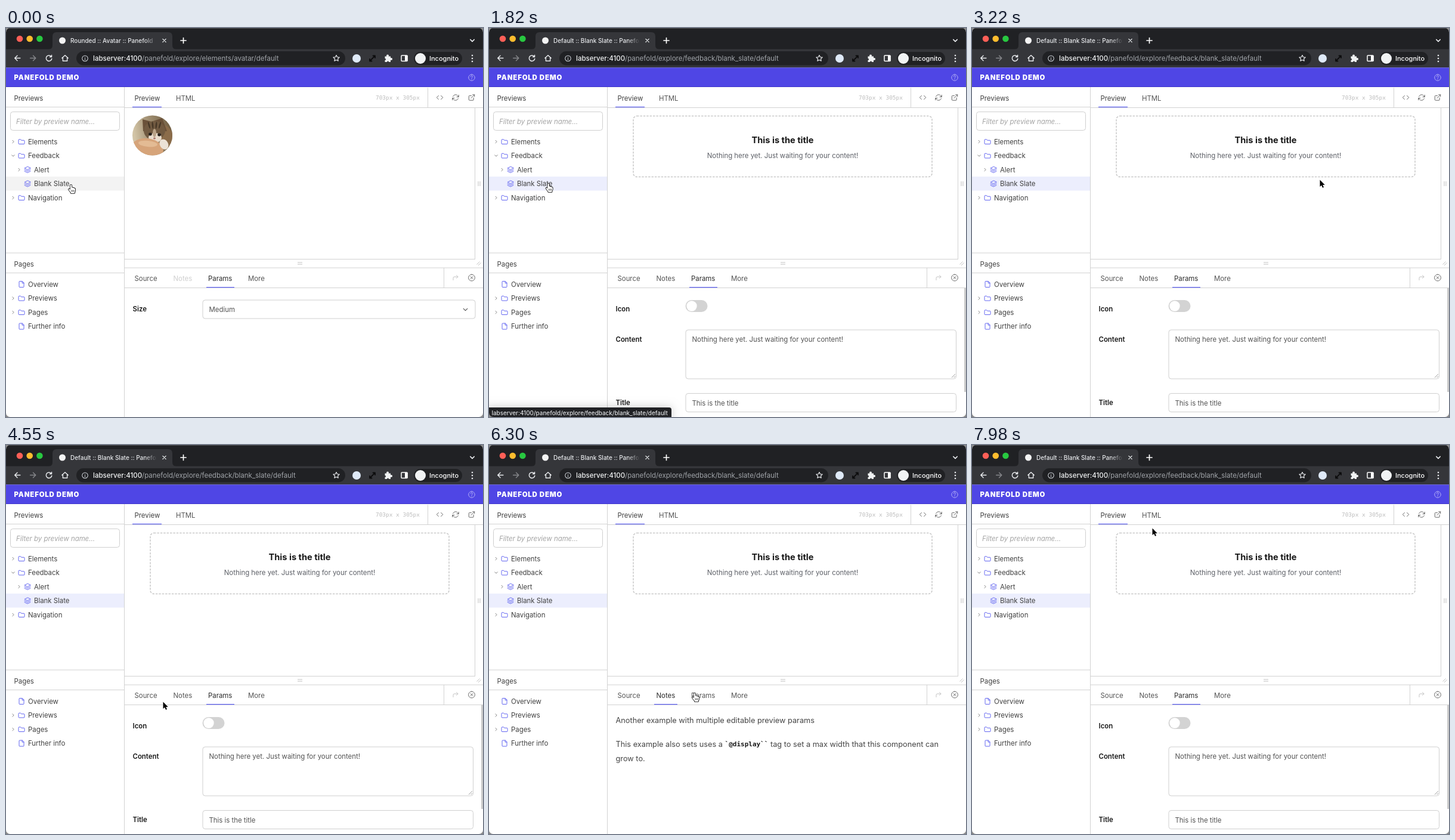
These frames come from a looping animation (800 by 652 pixels, 8000 ms). An HTML page with a canvas:

```html
<!DOCTYPE html>
<html lang="en">
<head>
<meta charset="utf-8">
<title>Component preview</title>
<style>
  html, body { margin: 0; width: 100%; height: 100%; overflow: hidden; background: #fff; }
  canvas { display: block; width: 800px; height: 652px; }
</style>
</head>
<body>
<canvas id="stage"></canvas>
<script>
const W = 800, H = 652, LOOP = 8000, STEP = 70;
const SANS = 'Inter, "Open Sans", sans-serif';
const MONO = '"DejaVu Sans Mono", monospace';
const INDIGO = '#4f46e5', ACCENT = '#6366f1', LINE = '#d2d2d2', INK = '#404040', SOFT = '#a3a3a3';
const BAR = '#35363a', DARK = '#202124';
const HOST = 'labserver:4100';

// Scene changes in ms
const STATUS_ON = 210, LOADED = 1470, STATUS_WIDE = 1680;
const NOTES_ON = 4830, NOTES_OFF = 6510;

// Pointer hot spot: time, x, y
const PATH = [
  [0, 109, 263], [420, 99.5, 261], [2380, 99.5, 261], [3080, 583.5, 254.5],
  [4200, 583.5, 254.5], [4550, 263.5, 430.5], [4740, 295, 416],
  [6020, 295, 416], [6230, 345, 416], [6650, 345, 416],
  [7140, 470, 505], [7420, 400, 470], [7980, 302.5, 139.5]
];

const canvas = document.getElementById('stage');
const c = canvas.getContext('2d');
const dpr = window.devicePixelRatio || 1;
canvas.width = W * dpr;
canvas.height = H * dpr;

function rect(x, y, w, h, fill) {
  c.fillStyle = fill;
  c.fillRect(x, y, w, h);
}

function round(x, y, w, h, r, fill, stroke, lw = 1) {
  c.beginPath();
  c.roundRect(x, y, w, h, r);
  if (fill) { c.fillStyle = fill; c.fill(); }
  if (stroke) { c.strokeStyle = stroke; c.lineWidth = lw; c.stroke(); }
}

function oval(x, y, rx, ry, turn, fill) {
  c.beginPath();
  c.ellipse(x, y, rx, ry, turn, 0, 7);
  c.fillStyle = fill;
  c.fill();
}

const disc = (x, y, r, fill) => oval(x, y, r, r, 0, fill);

// y is the middle of the capitals
function text(s, x, y, { size = 11.4, weight = 400, color = INK, font = SANS, align = 'left', style = '', gap = 0 } = {}) {
  c.font = `${style} ${weight} ${size}px ${font}`;
  c.textAlign = align;
  c.letterSpacing = gap + 'px';
  c.fillStyle = color;
  c.fillText(s, x, y + size * 0.36);
  return c.measureText(s).width;
}

// Icons are drawn on a 24 unit grid centred on x, y
const ICONS = {
  folder: 'M2 6.500a2 2 0 0 1 2-2h5l2.500 3H20a2 2 0 0 1 2 2V18a2 2 0 0 1-2 2H4a2 2 0 0 1-2-2z',
  file: 'M14 2H6a2 2 0 0 0-2 2v16a2 2 0 0 0 2 2h12a2 2 0 0 0 2-2V8zM14 2v6h6',
  layers: 'M12 2 2 7l10 5 10-5zM2 12l10 5 10-5M2 17l10 5 10-5',
  right: 'M9 6l6 6-6 6',
  down: 'M6 9l6 6 6-6',
  cross: 'M5 5l14 14M19 5 5 19',
  plus: 'M12 3v18M3 12h18',
  back: 'M21 12H4M12 4l-8 8 8 8',
  forward: 'M3 12h17M12 4l8 8-8 8',
  reload: 'M20 7a9.500 9.500 0 1 0 1.500 7M21 2v6h-6',
  home: 'M2 12 12 3l10 9M5 10v11h14V10',
  info: 'M12 2a10 10 0 1 0 .01 0M12 11v6M12 7v.5',
  help: 'M12 2a10 10 0 1 0 .01 0M9 9a3 3 0 1 1 4.500 2.600q-1.500.9-1.500 2.400M12 17v.5',
  close: 'M12 2a10 10 0 1 0 .01 0M8.500 8.500l7 7M15.500 8.500l-7 7',
  star: 'M12 2l3.100 6.500 7 .9-5.100 4.900 1.300 7.100L12 18l-6.300 3.400L7 14.300 1.900 9.400l7-.9z',
  code: 'M16 18l6-6-6-6M8 6l-6 6 6 6',
  sync: 'M22 4v6h-6M2 20v-6h6M3.500 9a9 9 0 0 1 15-3.400L22 10M2 14l3.500 4.400A9 9 0 0 0 20.500 15',
  open: 'M18 13v6a2 2 0 0 1-2 2H5a2 2 0 0 1-2-2V8a2 2 0 0 1 2-2h6M15 3h6v6M10 14 21 3',
  turn: 'M15 14l5-5-5-5M4 20v-7a4 4 0 0 1 4-4h12',
  grow: 'M14 3h7v7M10 21H3v-7M21 3 3 21'
};
for (const k in ICONS) ICONS[k] = new Path2D(ICONS[k]);

function icon(name, x, y, size, color, lw = 1) {
  c.save();
  c.translate(x, y);
  c.scale(size / 24, size / 24);
  c.translate(-12, -12);
  c.strokeStyle = color;
  c.lineWidth = lw * 24 / size;
  c.lineCap = c.lineJoin = 'round';
  c.stroke(ICONS[name]);
  c.restore();
}

function browser(loaded) {
  rect(0, 0, W, 66, DARK);
  rect(0, 0, W, 1, '#4d4e51');
  ['#ff5f57', '#febc2e', '#28c840'].forEach((col, i) => disc(23 + i * 16.7, 18, 5.300, col));
  rect(0, 35.500, W, 30.500, BAR);
  c.beginPath();
  c.moveTo(71, 36);
  c.quadraticCurveTo(78, 36, 78, 29);
  c.lineTo(78, 14);
  c.quadraticCurveTo(78, 7, 85, 7);
  c.lineTo(272, 7);
  c.quadraticCurveTo(279, 7, 279, 14);
  c.lineTo(279, 29);
  c.quadraticCurveTo(279, 36, 286, 36);
  c.fillStyle = BAR;
  c.fill();
  disc(94.500, 21, 5.500, '#f4f4f4');

  c.save();
  c.beginPath();
  c.rect(105, 8, 148, 26);
  c.clip();
  text(loaded ? 'Default :: Blank Slate :: Panefold' : 'Rounded :: Avatar :: Panefold', 108, 21,
    { size: 10, weight: 500, color: '#e8eaed' });
  c.restore();
  const fade = c.createLinearGradient(232, 0, 253, 0);
  fade.addColorStop(0, 'rgba(53,54,58,0)');
  fade.addColorStop(1, BAR);
  rect(232, 10, 22, 24, fade);
  icon('cross', 265.500, 21, 9, '#e8eaed', 1.400);
  icon('plus', 297.500, 21, 12, '#fff', 1.700);
  icon('down', 782, 21, 13, '#e8eaed', 1.500);

  icon('back', 19, 50.500, 13, '#e8eaed', 1.400);
  icon('forward', 45.500, 50.500, 13, '#85868a', 1.400);
  icon('reload', 72, 50.500, 12, '#e8eaed', 1.500);
  icon('home', 99, 50.500, 12.500, '#e8eaed', 1.400);
  round(118, 39, 451, 23.500, 12, DARK);
  icon('info', 132.500, 51, 11.500, '#bdc1c6', 1.100);
  const url = { size: 11.500, color: '#a0a4a9' };
  const w = text(HOST, 146, 50.500, { size: 11.500, weight: 500, color: '#f1f3f4' });
  text('/panefold/explore/' + (loaded ? 'feedback/blank_slate' : 'elements/avatar') + '/default', 146 + w, 50.500, url);
  icon('star', 554, 50.500, 12, '#e8eaed', 1.200);

  disc(588, 51, 7, '#dfeaf8');
  icon('grow', 614.500, 51, 12, '#0c0c0d', 1.800);
  rect(635.500, 47.500, 9.500, 9.500, '#f1f3f4');
  disc(640, 46.500, 2, '#f1f3f4');
  disc(646, 52, 2, '#f1f3f4');
  disc(635.500, 52.500, 1.600, BAR);
  disc(640.500, 57, 1.600, BAR);
  round(663, 46, 10, 9.500, 1, null, '#fff', 1.500);
  rect(669, 46, 4.500, 9.500, '#fff');
  round(684, 40, 81, 22, 11, DARK);
  disc(695, 51, 9, '#f1f3f4');
  text('Incognito', 710, 51, { size: 11, weight: 500, color: '#fff' });
  [46, 51, 56].forEach(y => disc(782, y, 1.300, '#e8eaed'));
}

function header() {
  rect(0, 65.500, W, 1, '#2c2a52');
  rect(0, 66.500, W, 32.500, INDIGO);
  rect(0, 98, W, 1, '#4038ca');
  text('PANEFOLD DEMO', 13.500, 83, { weight: 900, color: '#fff', gap: 0.850 });
  icon('help', 781, 83, 12.500, '#b9b5f6');
}

function branch(y, label, x, kind, arrow) {
  if (arrow) icon(arrow, x - 14, y, 9, '#777', 0.900);
  icon(kind, x, y, 12, ACCENT, 1);
  text(label, x + 11, y);
}

function sidebar(loaded, hover) {
  text('Previews', 13.500, 118);
  rect(0, 132, 198, 1, LINE);
  round(7.500, 140.500, 183, 31, 4, '#fff', '#cfcfcf');
  text('Filter by preview name...', 17, 156.500, { color: SOFT, style: 'italic' });
  if (loaded || hover) rect(0, 249, 198, 23.500, loaded ? '#eceefd' : '#f3f3f3');
  branch(190.500, 'Elements', 26, 'folder', 'right');
  branch(214, 'Feedback', 26, 'folder', 'down');
  branch(237.500, 'Alert', 36, 'layers', 'right');
  branch(261, 'Blank Slate', 36, 'layers');
  branch(284.500, 'Navigation', 26, 'folder', 'right');
  rect(0, 376.500, 198, 1, LINE);
  text('Pages', 13.500, 395.500);
  rect(0, 410, 198, 1, LINE);
  branch(429.500, 'Overview', 26, 'file');
  branch(453, 'Previews', 26, 'folder', 'right');
  branch(476.500, 'Pages', 26, 'folder', 'right');
  branch(500, 'Further info', 26, 'file');
  rect(198, 99, 1, H - 99, LINE);
}

function kitten() {
  c.save();
  c.beginPath();
  c.arc(245.500, 180, 33.500, 0, 7);
  c.clip();
  const back = c.createLinearGradient(214, 170, 278, 160);
  back.addColorStop(0, '#d2c4a6');
  back.addColorStop(0.350, '#a8977a');
  back.addColorStop(1, '#6d5a3f');
  rect(210, 145, 72, 72, back);
  oval(269, 184, 12, 22, -0.300, '#8b6c4a');
  c.fillStyle = '#6a5139';
  c.beginPath();
  c.moveTo(230, 173);
  c.lineTo(229, 153);
  c.lineTo(244, 157);
  c.lineTo(262, 151);
  c.lineTo(270, 173);
  c.fill();
  oval(249, 172, 18, 16, 0, '#715a41');
  [-9, -3, 3, 9].forEach(d => oval(249 + d, 163, 1.300, 6, d * 0.030, '#463726'));
  oval(250, 184, 11, 8, 0, '#e9ddcd');
  oval(249, 176, 3, 7, 0, '#b9a388');
  oval(242, 178, 2.800, 2.400, 0, '#25201b');
  oval(257, 179, 2.800, 2.400, 0, '#25201b');
  oval(249, 185, 2, 1.400, 0, '#a87469');
  oval(237, 203, 27, 18, 0.150, '#d6a47a');
  oval(238, 194, 16, 5, 0.100, '#e3bb94');
  oval(265, 195, 7, 9, -0.500, '#ece2d6');
  c.restore();
}

function blankSlate() {
  c.setLineDash([3.500, 1.900]);
  round(242, 147.500, 501, 102, 6, null, '#c9c9c9', 1.500);
  c.setLineDash([]);
  text('This is the title', 492.500, 187.500, { size: 14.600, weight: 700, color: '#181818', align: 'center' });
  text('Nothing here yet. Just waiting for your content!', 492.500, 214, { color: '#5c5f66', align: 'center' });
}

function preview(loaded) {
  text('Preview', 215.500, 118);
  text('HTML', 285, 118, { color: '#555' });
  text('703px x 305px', 620, 116.500, { size: 9.450, color: '#bdbdbd', font: MONO });
  rect(707, 100, 1, 33, LINE);
  icon('code', 727.500, 116.500, 12.500, '#666');
  icon('sync', 754, 116.500, 12.500, '#666');
  icon('open', 781, 116.500, 12.500, '#666');
  rect(199, 133, W - 199, 1, LINE);
  rect(212, 131.800, 49, 1.300, ACCENT);
  rect(786, 133, 1, 255, LINE);
  rect(199, 387, 588, 1, LINE);
  rect(489, 392.500, 8, 1, '#c2c2c2');
  rect(489, 395.500, 8, 1, '#c2c2c2');
  rect(791.500, 257, 1, 8, '#c2c2c2');
  rect(794.500, 257, 1, 8, '#c2c2c2');
  c.strokeStyle = '#c2c2c2';
  c.lineWidth = 1;
  c.beginPath();
  c.moveTo(789.500, 396.500);
  c.lineTo(794.500, 391.500);
  c.moveTo(792, 398);
  c.lineTo(796.500, 393.500);
  c.stroke();
  loaded ? blankSlate() : kitten();
}

const label = (s, y) => text(s, 212.500, y, { weight: 600, color: '#181818' });
const field = (y, w, h) => round(330, y, w, h, 4, '#fff', '#cfcfcf');

function params(loaded) {
  const value = { color: '#525252' };
  if (!loaded) {
    label('Size', 471);
    field(456, 457, 31);
    text('Medium', 340.500, 472, value);
    icon('down', 770.500, 472, 13, '#555', 1.200);
    return;
  }
  label('Icon', 471);
  round(329.500, 456, 37, 20, 10, '#d3d3d3');
  disc(340, 466, 8.700, '#fff');
  label('Content', 521.500);
  field(506, 453.500, 82);
  text('Nothing here yet. Just waiting for your content!', 340.500, 522, value);
  c.strokeStyle = '#888';
  c.lineWidth = 0.800;
  c.beginPath();
  c.moveTo(776, 586);
  c.lineTo(782, 580);
  c.moveTo(779.500, 586);
  c.lineTo(782, 583.500);
  c.stroke();
  label('Title', 628);
  field(612.500, 453.500, 31);
  text('This is the title', 340.500, 628.500, value);
  rect(797, 436, 3, 174, '#cbcbcb');
}

function notes() {
  const body = { size: 12.750, color: '#454545' };
  text('Another example with multiple editable preview params', 212.500, 461.500, body);
  let x = 212.500;
  x += text('This example also sets uses a ', x, 501.500, body);
  x += text('`@display``', x, 501.500, { size: 11, weight: 700, color: '#181818', font: MONO });
  text(' tag to set a max width that this component can', x, 501.500, body);
  text('grow to.', 212.500, 525, body);
}

function panel(loaded, onNotes) {
  rect(199, 401.500, W - 199, 1, LINE);
  rect(199, 435, W - 199, 1, LINE);
  text('Source', 215.500, 420, { color: '#555' });
  text('Notes', 280.500, 420, { color: !loaded ? '#cfcfcf' : onNotes ? '#2b2b2b' : '#555' });
  text('Params', 339, 420, { color: onNotes ? '#555' : '#2b2b2b' });
  text('More', 406, 420, { color: '#555' });
  rect(onNotes ? 277 : 336, 434, onNotes ? 39 : 47, 1.300, ACCENT);
  rect(734, 402, 1, 33, LINE);
  icon('turn', 754, 418.500, 12, '#c4c4c4');
  icon('close', 781, 418.500, 13, '#666');
  onNotes ? notes() : params(loaded);
}

function status(t) {
  const wide = t >= STATUS_WIDE;
  const w = wide ? 306 : 265.500;
  c.save();
  c.globalAlpha = Math.min(1, (t - STATUS_ON + STEP) / 140);
  c.shadowColor = 'rgba(0,0,0,.22)';
  c.shadowBlur = 16 * dpr;
  round(-4, 636, w + 4, 20, 4, DARK);
  c.shadowColor = 'transparent';
  text(`${HOST}/panefold/explore/feedback/${wide ? 'blank_slate' : '...'}/default`, 4.500, 645,
    { size: 9.900, weight: 500, color: '#dfe1e4' });
  c.restore();
}

function pointerAt(t) {
  let i = 1;
  while (i < PATH.length - 1 && PATH[i][0] < t) i++;
  const [t0, x0, y0] = PATH[i - 1], [t1, x1, y1] = PATH[i];
  const k = Math.min(1, (t - t0) / (t1 - t0));
  const e = k * k * (3 - 2 * k);
  return [x0 + (x1 - x0) * e, y0 + (y1 - y0) * e];
}

function isLink(x, y) {
  const within = (a, b) => x >= a && x <= b;
  if (y > 402 && y < 435) return within(212, 257) || within(277, 316) || within(336, 383) || within(403, 437);
  if (y > 100 && y < 133) return within(212, 261) || within(281, 320);
  return x < 198 && y > 178 && y < 296;
}

const ARROW = new Path2D('M0 0V11.600L2.700 9.200 4.500 13.300 6.500 12.400 4.700 8.400H8.300Z');
const HAND = new Path2D('M-1.300 1Q-1.300-.2 0-.2T1.300 1V4.600Q2.600 3.900 3.400 5 4.700 4.500 5.400 5.700 7.100 5.400 7.200 7.100V9.500Q7 11.500 6 12.300V14H-.2V12.800Q-2.200 11-3.800 8.200C-4.800 6.600-2.900 5.900-1.300 7.900Z');

function pointer(x, y) {
  const link = isLink(x, y);
  c.save();
  c.translate(x, y);
  c.lineJoin = 'round';
  c.lineWidth = 1.600;
  c.strokeStyle = link ? '#000' : '#fff';
  c.fillStyle = link ? '#fff' : '#000';
  c.stroke(link ? HAND : ARROW);
  c.fill(link ? HAND : ARROW);
  if (link) {
    c.lineWidth = 0.700;
    c.beginPath();
    [1, 3, 5].forEach(d => { c.moveTo(d, 8.500); c.lineTo(d, 11.500); });
    c.stroke();
  }
  c.restore();
}

function draw(t) {
  const loaded = t >= LOADED;
  const [x, y] = pointerAt(t);
  const hover = x < 198 && y > 249 && y < 273;
  c.setTransform(dpr, 0, 0, dpr, 0, 0);
  rect(0, 0, W, H, '#8a8a8a');
  c.save();
  c.beginPath();
  c.roundRect(0, 0, W, H, 7);
  c.clip();
  rect(0, 0, W, H, '#fff');
  browser(loaded);
  header();
  sidebar(loaded, hover);
  preview(loaded);
  panel(loaded, t >= NOTES_ON && t < NOTES_OFF);
  if (t >= STATUS_ON && hover) status(t);
  c.restore();
  pointer(x, y);
}

const start = performance.now();
function tick() {
  const t = (performance.now() - start) % LOOP;
  draw(Math.floor(t / STEP) * STEP);
  requestAnimationFrame(tick);
}
tick();
</script>
</body>
</html>
```
